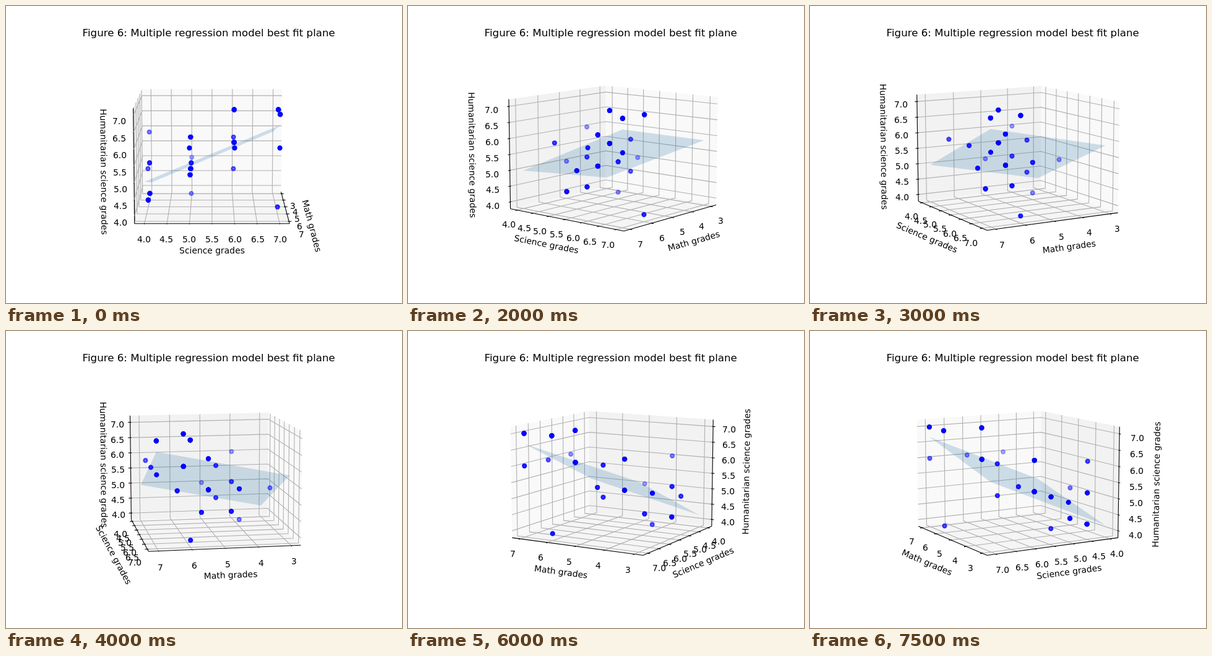
Write an HTML page with a canvas that moves like this. It is 640 px wide and 480 px high and loops after 8 s.

```html
<!DOCTYPE html>
<html lang="en">
<head>
<meta charset="utf-8">
<title>Best fit plane</title>
<style>
html, body { margin: 0; width: 100%; height: 100%; overflow: hidden; background: #fff; }
canvas { display: block; }
</style>
</head>
<body>
<canvas id="stage" width="640" height="480"></canvas>
<script>
const ctx = document.getElementById('stage').getContext('2d');
const FONT = '"DejaVu Sans", sans-serif';
const PT = 100 / 72;
const LINE = 0.8 * PT;

// Axis order: math, science, humanitarian science
const low = [2.8, 3.85, 3.85], high = [7.2, 7.15, 7.15];
const box = [8 / 7, 8 / 7, 6 / 7];
const range = low.map((v, i) => high[i] - v);
const center = low.map((v, i) => (v + high[i]) / 2);
const delta = range.map(r => r / 12);
const mins = low.map((v, i) => v - delta[i] / 4);
const maxs = high.map((v, i) => v + delta[i] / 4);
const perPoint = 48 / 532.224;

const halves = [4, 4.5, 5, 5.5, 6, 6.5, 7];
const axes = [
  { name: 'Math grades', ticks: [3, 4, 5, 6, 7], digits: 0, side: 1, pane: 249 },
  { name: 'Science grades', ticks: halves, digits: 1, side: 0, pane: 242 },
  { name: 'Humanitarian science grades', ticks: halves, digits: 1, side: 0, pane: 245 }
];

// math, science, humanitarian, number of pupils
const points = [
  [4, 4, 6, 1], [4, 4, 5, 3], [4, 4, 4, 6], [5, 4, 5, 1], [5, 4, 4, 5],
  [7, 5, 6, 1], [6, 5, 5, 3], [5, 5, 6, 4], [5, 5, 5, 8], [4, 5, 5, 3],
  [4, 5, 4, 1], [3, 5, 5, 1], [5, 6, 6, 1], [5, 6, 5, 1], [6, 6, 7, 3],
  [6, 6, 6, 6], [7, 6, 6, 1], [7, 7, 7, 3], [7, 7, 6, 1], [6, 7, 7, 3], [6, 7, 4, 1]
];
const fit = (m, s) => [m, s, 4.16 + 0.206 * (m - 3) + 0.566 * (s - 4)];
const plane = [fit(3, 4), fit(7, 4), fit(7, 7), fit(3, 7)];

const rad = deg => deg * Math.PI / 180;
const cosE = Math.cos(rad(10)), sinE = Math.sin(rad(10));
let cosA, sinA;

function project(p) {
  const [x, y, z] = p.map((v, i) => (v - center[i]) / range[i] * box[i]);
  const near = cosA * x + sinA * y;
  const d = 10 - cosE * near - sinE * z;
  const k = 1997.84 / d;
  return { x: 333 + k * (cosA * y - sinA * x), y: 237.4 - k * (cosE * z - sinE * near), d };
}

function trace(pts) {
  ctx.beginPath();
  pts.map(project).forEach(p => ctx.lineTo(p.x, p.y));
}

function stroke(pts, color) {
  trace(pts);
  ctx.strokeStyle = color;
  ctx.lineWidth = LINE;
  ctx.stroke();
}

const put = (p, i, v) => p.map((old, j) => j === i ? v : old);

// Push a position away from the middle along the axes other than `axis`
const outward = (p, axis, points) => p.map((v, i) =>
  i === axis ? v : v + Math.sign(v - center[i]) * points * perPoint * delta[i]);

function drawPane(i, back) {
  const j = (i + 1) % 3, k = (i + 2) % 3;
  const corner = (a, b) => put(put(back, j, a[j]), k, b[k]);
  trace([corner(mins, mins), corner(maxs, mins), corner(maxs, maxs), corner(mins, maxs)]);
  ctx.closePath();
  ctx.fillStyle = `rgb(${axes[i].pane},${axes[i].pane},${axes[i].pane})`;
  ctx.fill();
}

function drawAxis(i, back, front, highs) {
  const { name, ticks, digits, side } = axes[i];
  const start = put(back, side, front[side]);
  const end = put(start, i, front[i]);
  stroke([start, end], '#000');

  const a = project(start), b = project(end);
  let angle = (Math.atan2(a.y - b.y, b.x - a.x) * 180 / Math.PI + 360) % 180;
  if (angle > 90) angle -= 180;
  const mid = project(outward(put(start, i, (start[i] + end[i]) / 2), i, 25));
  ctx.font = `${10 * PT}px ${FONT}`;
  ctx.fillStyle = '#000';
  ctx.save();
  ctx.translate(mid.x, mid.y);
  ctx.rotate(-rad(angle));
  ctx.textAlign = 'center';
  ctx.fillText(name, 0, 3.8);
  ctx.restore();

  const j = (i + 1) % 3, k = (i + 2) % 3;
  for (const t of ticks) {
    const root = put(back, i, t);
    stroke([put(root, j, front[j]), root, put(root, k, front[k])], '#b0b0b0');
  }

  const step = (highs[side] ? 1 : -1) * delta[side];
  ctx.textAlign = 'left';
  for (const t of ticks) {
    const p = put(start, i, t);
    stroke([put(p, side, p[side] + 0.1 * step), put(p, side, p[side] - 0.2 * step)], '#000');
    const at = project(outward(p, i, 11.5));
    const text = t.toFixed(digits);
    ctx.fillText(text, Math.round(at.x - ctx.measureText(text).width / 2), Math.round(at.y + 10.6));
  }
}

function drawPoints() {
  const dots = points.map(p => ({ ...project(p), count: p[3] })).sort((a, b) => b.d - a.d);
  const far = 1 / dots[0].d, near = 1 / dots[dots.length - 1].d;
  ctx.lineWidth = 1.5 * PT;
  for (const { x, y, d, count } of dots) {
    const alpha = 0.3 + 0.7 * (1 / d - far) / (near - far);
    ctx.fillStyle = ctx.strokeStyle = `rgba(0,0,255,${alpha})`;
    ctx.beginPath();
    ctx.arc(x, y, Math.sqrt(20) / 2 * PT, 0, 2 * Math.PI);
    for (let n = 0; n < count; n++) {
      ctx.fill();
      ctx.stroke();
    }
  }
}

function draw(azimuth) {
  cosA = Math.cos(rad(azimuth));
  sinA = Math.sin(rad(azimuth));
  ctx.fillStyle = '#fff';
  ctx.fillRect(0, 0, 640, 480);

  const highs = [cosA, sinA, sinE].map(v => v < -1e-9);
  const back = highs.map((h, i) => h ? maxs[i] : mins[i]);
  const front = highs.map((h, i) => h ? mins[i] : maxs[i]);
  axes.forEach((_, i) => drawPane(i, back));
  axes.forEach((_, i) => drawAxis(i, back, front, highs));

  trace(plane);
  ctx.fillStyle = 'rgba(27,105,158,0.2)';
  ctx.fill();
  drawPoints();

  ctx.font = `${12 * PT}px ${FONT}`;
  ctx.fillStyle = '#000';
  ctx.textAlign = 'center';
  ctx.fillText('Figure 6: Multiple regression model best fit plane', 327.7, 49);
}

// The view turns ten degrees every half second
const begin = performance.now();
let shown = -1;
function tick() {
  const step = Math.floor((performance.now() - begin) / 500) % 16;
  if (step !== shown) draw(10 * (shown = step));
  requestAnimationFrame(tick);
}
tick();
</script>
</body>
</html>
```
